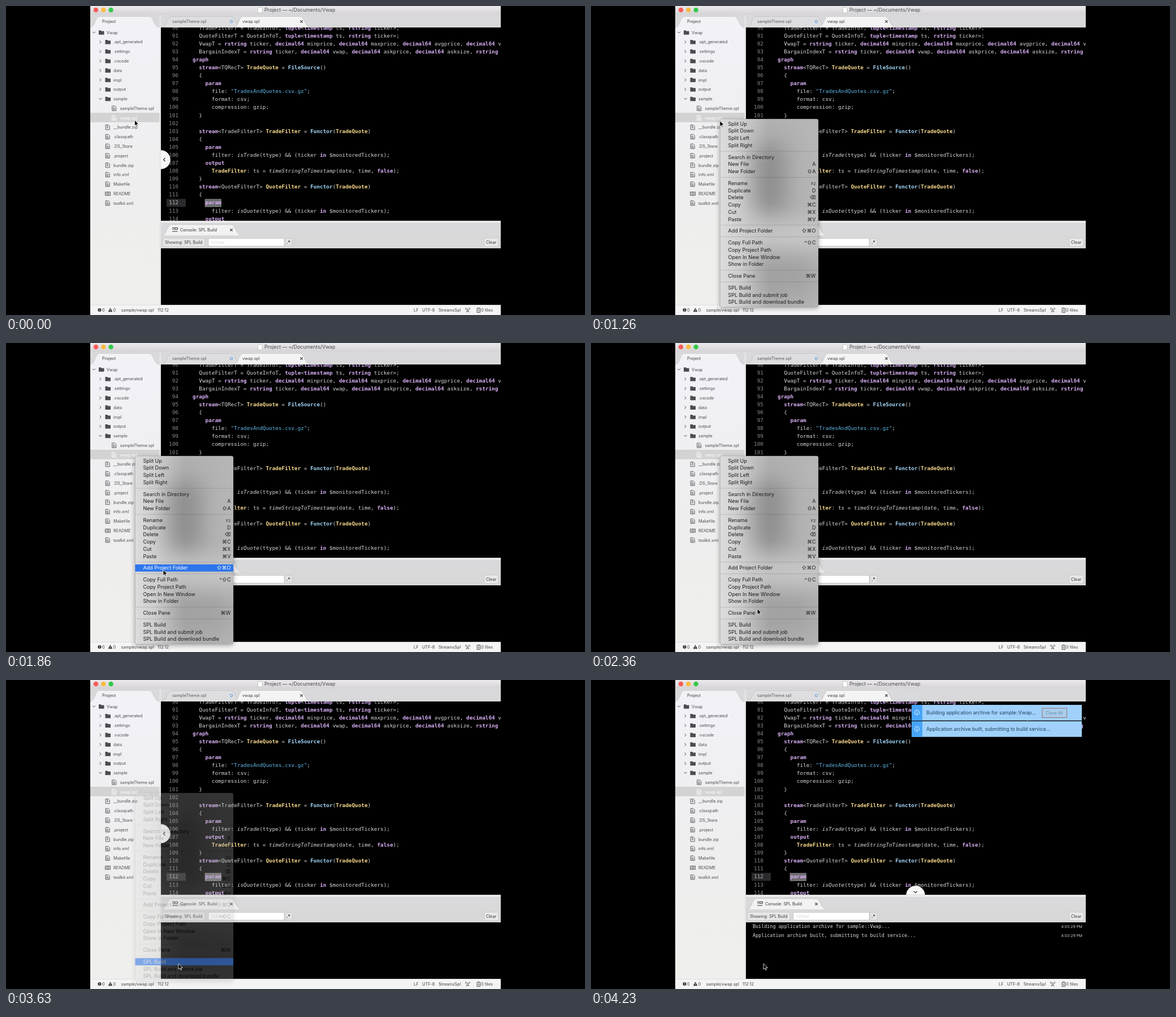
An HTML page for the animation above (8 s loop, 1024 by 547 pixels).

```html
<!DOCTYPE html>
<html lang="en">
<head>
<meta charset="utf-8">
<title>Editor build menu</title>
<style>
html, body { margin: 0; width: 100%; height: 100%; overflow: hidden; background: #000; }
svg { display: block; width: 100vw; height: 100vh; }
text { white-space: pre; font-family: Inter, "DejaVu Sans", sans-serif; }
.mono { font-family: "DejaVu Sans Mono", monospace; }
.kw { fill: #d9b0f5; font-weight: bold; }
.name { fill: #f8d98c; font-weight: bold; }
.op { fill: #a5d8fb; font-weight: bold; }
.str { fill: #62b9e6; }
.fn { font-style: italic; }
</style>
</head>
<body>
<svg id="stage" viewBox="0 0 1024 547" preserveAspectRatio="none">
  <defs>
    <linearGradient id="title" x2="0" y2="1"><stop stop-color="#ebe9eb"/><stop offset="1" stop-color="#d4d2d4"/></linearGradient>
    <linearGradient id="side" x2="0" y2="1"><stop stop-color="#f1f1f7"/><stop offset=".6" stop-color="#eeeeee"/><stop offset="1" stop-color="#efefec"/></linearGradient>
    <linearGradient id="glass"><stop stop-color="#dcdcdc"/><stop offset=".2" stop-color="#cfcfcf"/><stop offset=".5" stop-color="#b0b0b0"/><stop offset="1" stop-color="#b6b6b6"/></linearGradient>
    <filter id="soft" x="-80%" y="-80%" width="260%" height="260%"><feGaussianBlur stdDeviation="19"/></filter>
    <filter id="shade" x="-10%" y="-10%" width="120%" height="120%"><feGaussianBlur stdDeviation="4"/></filter>
    <clipPath id="edit"><rect x="274" y="38" width="601" height="342.5"/></clipPath>
    <clipPath id="box"><rect x="228.5" y="200" width="173.5" height="333" rx="3"/></clipPath>
  </defs>
</svg>
<script>
const NS = 'http://www.w3.org/2000/svg';
const stage = document.getElementById('stage');

function el(tag, attrs, parent = stage) {
  const node = document.createElementNS(NS, tag);
  for (const k in attrs) node.setAttribute(k, attrs[k]);
  parent.appendChild(node);
  return node;
}
const group = (parent, attrs = {}) => el('g', attrs, parent);
const rect = (x, y, width, height, fill, parent, more) => el('rect', { x, y, width, height, fill, ...more }, parent);
const line = (d, stroke, parent, w = 1, fill = 'none') =>
  el('path', { d, stroke, fill, 'stroke-width': w }, parent);
function label(x, y, str, size, fill, parent, more) {
  const node = el('text', { x, y, 'font-size': size, fill, ...more }, parent);
  node.textContent = str;
  return node;
}
const cross = (x, y) => line(`M${x - 2.2} ${y - 2.2}l4.4 4.4m0 -4.4l-4.4 4.4`, '#333', stage, 1.1);
const UI = 7.3;
const INK = '#4c4c50';

// Window chrome
function drawChrome() {
  rect(149, 0, 726, 547, '#f4f4f4');
  rect(149, 0, 726, 16, 'url(#title)');
  ['#fc5b57', '#fdbc40', '#34c84a'].forEach((fill, i) =>
    el('circle', { cx: 159 + 13.3 * i, cy: 7, r: 4.2, fill }));
  line('M445.5 2.5h5l2.5 2.5v7h-7.5z', '#b8b8b8', stage, .7, '#fff');
  label(457, 10.3, 'Project — ~/Documents/Vwap', 8.75, '#48484a');

  rect(149, 15.5, 726, 22.5, '#d9d9db');
  rect(149, 38, 123, 491, 'url(#side)');
  line('M149 38C157 38 158 18.5 165 18.5H253C261 18.5 262 38 271 38', '#c2c2c4', stage, .7, '#f2f2f6');
  label(170, 29.7, 'Project', UI, '#3c3c40');
  rect(271.5, 16, 2.5, 513, '#e6e6e6');
  line('M276 38C284 38 285 18.5 292 18.5H398C406 18.5 407 38 416 38', '#bcbcbe', stage, .7, '#dedee0');
  line('M403 38C411 38 412 18.5 419 18.5H520C528 18.5 529 38 538 38', '#bcbcbe', stage, .7, '#f4f4f4');
  label(294, 29.7, 'sampleTheme.spl', UI, '#59595c');
  label(418, 29.7, 'vwap.spl', UI, '#3c3c40');
  el('circle', { cx: 398.5, cy: 27.5, r: 2.2, fill: 'none', stroke: '#4c95dd' });
  cross(522.5, 27.5);
}

// Project tree: [depth, name, kind]
const tree = [
  [0, 'Vwap', 'open'], [1, '.apt_generated', 'dir'], [1, '.settings', 'dir'], [1, '.vscode', 'dir'],
  [1, 'data', 'dir'], [1, 'impl', 'dir'], [1, 'output', 'dir'], [1, 'sample', 'open'],
  [2, 'sampleTheme.spl', 'file'], [2, 'vwap.spl', 'file'], [1, '__bundle.zip', 'zip'],
  [1, '.classpath', 'file'], [1, '.DS_Store', 'file'], [1, '.project', 'file'], [1, 'bundle.zip', 'zip'],
  [1, 'info.xml', 'file'], [1, 'Makefile', 'file'], [1, 'README', 'book'], [1, 'toolkit.xml', 'file']
];
function drawTree() {
  rect(149, 189, 122.5, 16.8, '#d3d3d3');
  tree.forEach(([depth, name, kind], i) => {
    const y = 47 + i * 16.78, x = 164 + depth * 11.5;
    const ink = i === 9 ? '#fff' : INK;
    if (kind === 'dir') line(`M${x - 10} ${y - 2.5}l2.5 2.5l-2.5 2.5`, ink);
    if (kind === 'open') line(`M${x - 11} ${y - 1.5}l2.5 2.5l2.5 -2.5`, ink);
    if (kind === 'dir' || kind === 'open') {
      line(`M${x} ${y - 3.8}h3.8l1 1.3h4.7v6.3h-9.5z`, 'none', stage, 0, ink);
    } else if (kind === 'book') {
      line(`M${x} ${y - 3}h4.5v6h-4.5zm4.5 0h4.5v6h-4.5M${x + 1.3} ${y - 1}h2m-2 2h2m2.4 -2h2m-2 2h2`, ink, stage, .9);
    } else {
      line(`M${x + .7} ${y - 4.2}h4.8l2.2 2.2v6h-7z`, ink, stage, .9);
      line(kind === 'zip' ? `M${x + 3.5} ${y - 3.5}v5.5m1.2 -4v3` : `M${x + 2} ${y - 1.2}h3m-3 1.7h4m-4 1.7h4`, ink, stage, .8);
    }
    label(x + (depth ? 14.5 : 14), y + 2.6, name, UI, ink);
  });
}

// Code pane
const code = [
  '  TradeFilterT = TradeInfoT, tuple<timestamp ts, rstring ticker>;',
  '  QuoteFilterT = QuoteInfoT, tuple<timestamp ts, rstring ticker>;',
  '  VwapT = rstring ticker, decimal64 minprice, decimal64 maxprice, decimal64 avgprice, decimal64 vwap;',
  '  BargainIndexT = rstring ticker, decimal64 vwap, decimal64 askprice, decimal64 asksize, rstring ts;',
  'graph',
  '  stream<TQRecT> TradeQuote = FileSource()', '  {', '    param',
  '      file: "TradesAndQuotes.csv.gz";', '      format: csv;', '      compression: gzip;', '  }', '',
  '  stream<TradeFilterT> TradeFilter = Functor(TradeQuote)', '  {', '    param',
  '      filter: isTrade(ttype) && (ticker in $monitoredTickers);', '    output',
  '      TradeFilter: ts = timeStringToTimestamp(date, time, false);', '  }',
  '  stream<QuoteFilterT> QuoteFilter = Functor(TradeQuote)', '  {', '    param',
  '      filter: isQuote(ttype) && (ticker in $monitoredTickers);', '    output'
];
const rules = [
  ['str', /^"[^"]*"/],
  ['kw', /^(graph|stream|param|output|tuple|timestamp|rstring|decimal64|in|false)$/],
  ['name', /^(TradeQuote|TradeFilter|QuoteFilter)$/],
  ['op', /^(FileSource|Functor)$/],
  ['fn', /^(isTrade|isQuote|timeStringToTimestamp)$/]
];
function drawCode(pane) {
  rect(274, 38, 601, 343, '#000', pane);
  rect(284, 341.5, 34, 14, '#2b2b2d', pane);
  rect(352, 342, 28.5, 13.5, '#6d6d70', pane, { stroke: '#8e8e92', 'stroke-width': .7 });
  code.forEach((src, i) => {
    const y = 55.6 + (i - 1) * 14.09;
    label(305, y, 90 + i, 9.36, i === 22 ? '#b5b5b5' : '#8b8b8d', pane, { class: 'mono', 'text-anchor': 'end' });
    const row = label(330, y, '', 9.36, '#d6d6d6', pane, { class: 'mono' });
    for (const part of src.match(/"[^"]*"|\w+|[^\w"]+/g) || []) {
      const rule = rules.find(r => r[1].test(part));
      el('tspan', rule ? { class: rule[0] } : {}, row).textContent = part;
    }
  });
}

// Console and status bar
function drawConsole() {
  rect(274, 380.5, 601, 3, '#f4f0f0');
  rect(274, 383.5, 601, 22.5, '#d9d9db');
  line('M276 406C284 406 285 387 292 387H398C406 387 407 406 416 406', '#bcbcbe', stage, .7, '#f2f2f2');
  line('M294 392.5h3.5m-3.5 2.5h3.5m-3.5 4h9.5m-5 -6.5h5v3h-5z', '#333');
  label(308, 399, 'Console: SPL Build', UI, '#333');
  cross(398.5, 396.5);
  rect(274, 406, 601, 23, '#d8d8d8');
  const edge = { rx: 2, stroke: '#c2c2c2', 'stroke-width': .7 };
  rect(277, 411, 75, 15, '#e6e6e6', stage, edge);
  label(281, 421.2, 'Showing: SPL Build', UI, '#3c3c3c');
  rect(358, 411.5, 134, 13.5, '#fff', stage, edge);
  label(363, 420.8, 'filter', 6.65, '#c4c4c4', stage, { class: 'mono' });
  rect(493.5, 411.5, 13, 13.5, '#e2e2e2', stage, edge);
  label(496, 421, '.*', 8, '#222', stage, { 'font-weight': 600 });
  rect(846, 411, 25, 15, '#e8e8e8', stage, edge);
  label(849, 421.2, 'Clear', UI, '#333');
  rect(274, 429, 601, 100, '#000');

  rect(149, 529, 726, 18, '#f4f4f4');
  line('M149 529.5H875', '#dadada', stage, .8);
  el('circle', { cx: 165.5, cy: 538, r: 3.1, fill: '#333' });
  line('M165.5 536v2.4m0 .6v1', '#fff', stage, .9);
  line('M184.5 534.8l3.3 6.2h-6.6z', '#333', stage, .6, '#333');
  line('M184.5 536.8v2m0 .6v.9', '#fff', stage, .8);
  [[170, '0'], [189.5, '0'], [203.5, 'sample/vwap.spl'], [268, '112:12'], [721, 'LF'],
    [736, 'UTF-8'], [765, 'StreamsSpl'], [840, '0 files']].forEach(([x, s]) => label(x, 540.8, s, UI, '#3e3e40'));
  line('M816.5 536.5l-2.5 6m2.5 -6l2.5 6m-4 -2h3M813.5 533.8q-2 2 0 4m6 0q2 -2 0 -4M815 534.8q-1 1 0 2m3 0q1 -1 0 -2', '#444', stage, .8);
  line('M833 535h5.5v7.5h-5.5zM834.5 534.5h2.5M834.5 538h2.5m-2.5 2h2.5', '#444', stage, .9);
}

drawChrome();
drawTree();
const editor = group(stage, { 'clip-path': 'url(#edit)' });
drawCode(editor);
drawConsole();

// Dock toggles
function toggle(cx, cy, chevron) {
  const g = group(editor);
  el('circle', { cx, cy, r: 16.7, fill: '#f6f6f6' }, g);
  line(chevron, '#333', g, 1.2);
  return g;
}
const sideToggle = toggle(274, 272, 'M281.3 269l-2.8 3l2.8 3');
const dockToggle = toggle(574, 381, 'M571 374l3 2.8l3 -2.8');

// Console output
const logs = ['Building application archive for sample::Vwap...', 'Application archive built, submitting to build service...'];
const logRows = logs.map((s, i) => {
  const g = group(stage), y = 439.3 + i * 16;
  label(286, y, s, 8.42, '#dcdcdc', g, { class: 'mono' });
  label(869, y - .3, '4:03:29 PM', 6.8, '#d0d0d0', g, { 'text-anchor': 'end' });
  return g;
});

// Notifications
const notes = logs.map((s, i) => {
  const g = group(stage), y = 44 + i * 29;
  rect(567, y, 301, 27.7, '#9fd1fb', g);
  rect(567, y, 19, 27.7, '#47a4fb', g);
  el('circle', { cx: 576.5, cy: y + 13.5, r: 4.2, fill: 'none', stroke: '#e4f3ff' }, g);
  line(`M576.5 ${y + 11}v1.2m0 1v3`, '#e4f3ff', g, 1.1);
  label(593, y + 17.2, s, 8.7, '#20405e', g);
  return g;
});
const closeAll = group(stage);
rect(798, 50, 43.5, 16.5, '#a9cdec', closeAll, { stroke: '#9a6f78' });
label(804.5, 61, 'Close All', 7.2, '#6787a5', closeAll);

// Context menu; null is a separator
const items = [
  ['Split Up'], ['Split Down'], ['Split Left'], ['Split Right'], null,
  ['Search in Directory'], ['New File', 'A'], ['New Folder', '⇧A'], null,
  ['Rename', 'F2'], ['Duplicate', 'D'], ['Delete', '⌫'], ['Copy', '⌘C'], ['Cut', '⌘X'], ['Paste', '⌘V'], null,
  ['Add Project Folder', '⇧⌘O'], null,
  ['Copy Full Path', '^⇧C'], ['Copy Project Path'], ['Open In New Window'], ['Show in Folder'], null,
  ['Close Pane', '⌘W'], null,
  ['SPL Build'], ['SPL Build and submit job'], ['SPL Build and download bundle']
];
const ROW = 12.75, GAP = 8;
const panel = group(stage);
rect(228, 203, 174, 332, '#000', panel, { rx: 4, opacity: .35, filter: 'url(#shade)' });
const glass = group(panel, { 'clip-path': 'url(#box)' });
rect(228, 200, 175, 334, 'url(#glass)', glass);
rect(285, 245, 60, 120, '#6c6c6c', glass, { opacity: .5, filter: 'url(#soft)' });
rect(290, 440, 110, 75, '#8a8a8a', glass, { opacity: .4, filter: 'url(#soft)' });
rect(280, 385, 140, 40, '#e4e4e4', glass, { opacity: .5, filter: 'url(#soft)' });
rect(228.5, 200, 173.5, 333, 'none', panel, { rx: 3, stroke: '#8e8e8e', 'stroke-opacity': .5, 'stroke-width': .6 });

function itemText(parent, fill) {
  return [label(242.5, 0, '', 9, fill, parent), label(397.5, 0, '', 9, fill, parent, { 'text-anchor': 'end' })];
}
function setItem(pair, [name, keys = ''], mid) {
  pair.forEach((node, i) => {
    node.setAttribute('y', mid + 3.2);
    node.textContent = i ? keys : name;
  });
  pair[1].setAttribute('font-size', keys === 'F2' ? 6.8 : 9);
}
const rows = [];
let edgeY = 208.5 - ROW / 2;
for (const item of items) {
  if (item) {
    const mid = edgeY + ROW / 2;
    rows.push({ item, mid });
    setItem(itemText(panel, '#1c1c1c'), item, mid);
    edgeY += ROW;
  } else {
    rect(228.5, edgeY + GAP / 2 - .5, 173.5, 1, '#000', panel, { opacity: .13 });
    edgeY += GAP;
  }
}
const hover = group(stage);
const bar = rect(228.5, 0, 173.5, ROW, '#2d75ec', hover);
const hoverText = itemText(hover, '#fff');

// Pointer
const pointer = el('path', {
  d: 'M0 0V10.2L2.4 8L4 11.6L5.6 10.9L4 7.4H7.3Z',
  fill: '#000', stroke: '#fff', 'stroke-width': .8, 'stroke-linejoin': 'round'
});
const cubic = u => u < .5 ? 4 * u ** 3 : 1 - 4 * (1 - u) ** 3;
const linear = u => u;
// start, end, steps, x, y, easing
const moves = [
  [1260, 1460, 7, 258, 305, cubic],
  [1700, 1860, 6, 278, 401.5, cubic],
  [2060, 2200, 5, 293, 467, cubic],
  [2360, 2660, 10, 304, 501.5, linear],
  [3130, 3130, 1, 305, 502, linear]
];
function pointerAt(t) {
  let x = 227.5, y = 202;
  for (const [from, to, n, x1, y1, ease] of moves) {
    if (t < from) break;
    const k = t >= to ? n : Math.floor((t - from) * (n - 1) / (to - from)) + 1;
    const u = ease(k / n);
    x += (x1 - x) * u;
    y += (y1 - y) * u;
  }
  return [x, y];
}

const ramp = (t, from, len) => Math.min(1, Math.max(0, (t - from) / len));
const easeOut = u => 1 - (1 - u) ** 2;
const show = (node, on) => node.setAttribute('visibility', on ? 'visible' : 'hidden');

function draw(t) {
  const [x, y] = pointerAt(t);
  pointer.setAttribute('transform', `translate(${x} ${y})`);

  const open = t >= 530 && t < 3730;
  const left = 1 - ramp(t, 3530, 200);
  show(panel, open);
  panel.setAttribute('opacity', left ** 1.8);
  const blink = t >= 3400 && t < 3460;
  const over = open && !blink && x > 229 && rows.find(r => Math.abs(y - r.mid) < ROW / 2);
  show(hover, over);
  if (over) {
    bar.setAttribute('y', over.mid - ROW / 2);
    setItem(hoverText, over.item, over.mid);
    hover.setAttribute('opacity', left ** .85);
  }

  const slide = easeOut(ramp(t, 3930, 200));
  sideToggle.setAttribute('transform', `translate(${-18 * slide} 0)`);
  dockToggle.setAttribute('transform', `translate(0 ${18 * (1 - slide)})`);

  logRows.forEach((g, i) => show(g, t >= 3930 + i * 130));
  notes.forEach((g, i) => {
    const u = easeOut(ramp(t, 3940 + i * 130, 160)), mid = 58 + i * 29;
    show(g, u > 0);
    g.setAttribute('opacity', u);
    g.setAttribute('transform', `translate(0 ${mid - 8 * (1 - u)}) scale(1 ${u}) translate(0 ${-mid})`);
  });
  show(closeAll, t >= 4070);
}

const start = performance.now();
function tick() {
  draw((performance.now() - start) % 8000);
  requestAnimationFrame(tick);
}
tick();
</script>
</body>
</html>
```
